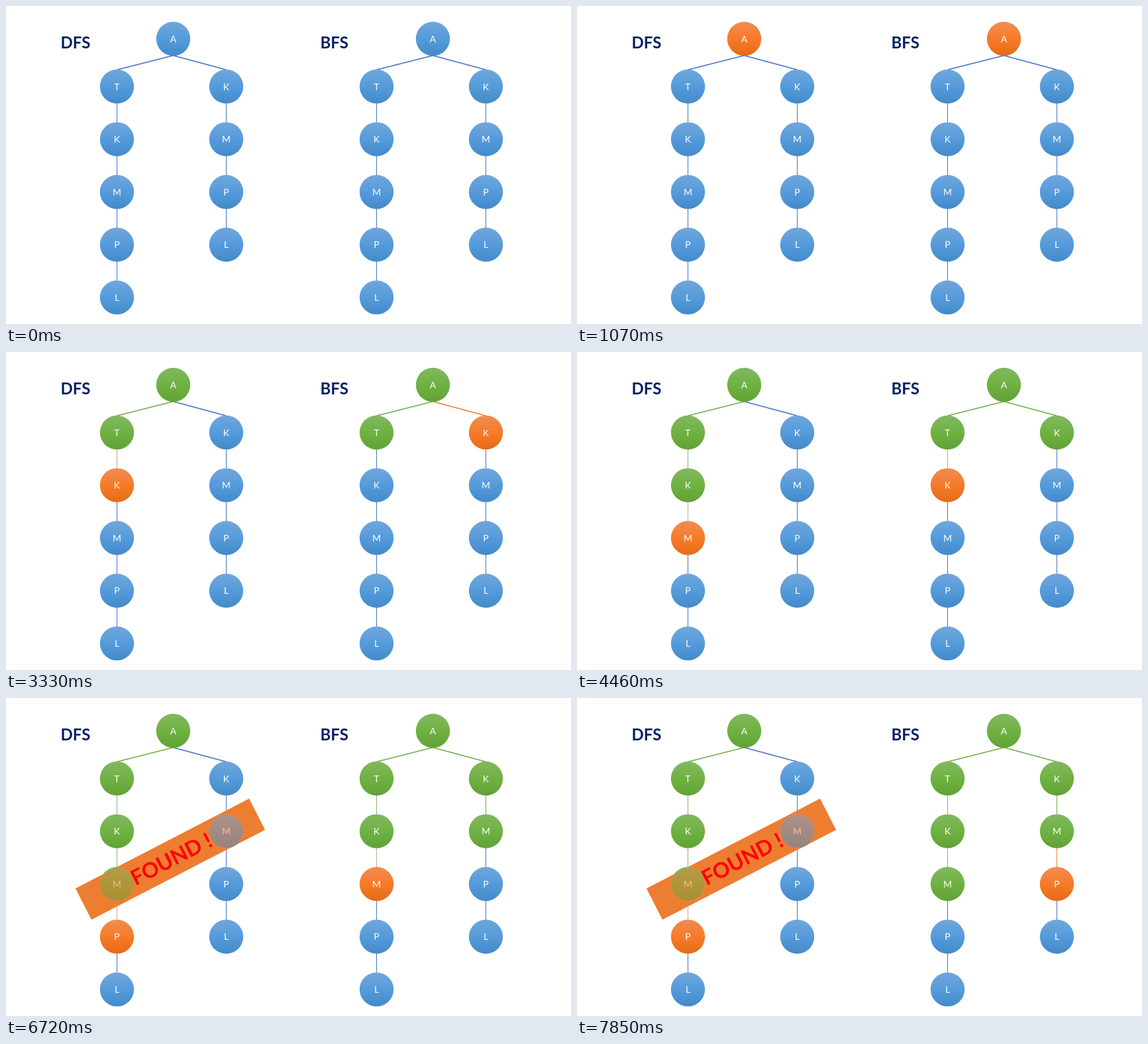
Write an HTML page with a canvas that moves like this. It is 853x480 px and loops after 8 s.

```html
<!DOCTYPE html>
<html lang="en">
<head>
<meta charset="utf-8">
<title>DFS and BFS</title>
<style>
html, body { margin: 0; width: 100%; height: 100%; overflow: hidden; background: #fff; }
canvas { display: block; }
</style>
</head>
<body>
<canvas id="stage" width="853" height="480"></canvas>
<script>
const ctx = document.getElementById('stage').getContext('2d');
const LOOP = 8000, FIRST = 1070, STEP = 1130;
const R = 25.7, FONT = 'Lato, "Open Sans", sans-serif';

const FILL = {
  idle: ['#71a6db', '#559bdb', '#438ac9'],
  active: ['#f18c55', '#f67b28', '#e56b17'],
  done: ['#81b861', '#6fb242', '#61a235']
};
const EDGE = { idle: '#4472c4', active: '#ed7d31', done: '#70ad47' };
const SOFT_EDGE = { idle: '#4472c4', active: '#c9a793', done: '#8fae78' };

// Node 0 is the root, 1-5 the left branch, 6-9 the right branch.
const nodes = [{ name: 'A', x: 252.5, y: 49.5, parent: -1 }];
function addBranch(names, x) {
  [...names].forEach((name, i) => {
    nodes.push({ name, x, y: 121.5 + 79.6 * i, parent: i ? nodes.length - 1 : 0 });
  });
}
addBranch('TKMPL', 167.5);
addBranch('KMPL', 332.5);

const trees = [
  { title: 'DFS', dx: 0, order: [0, 1, 2, 3, 4] },
  { title: 'BFS', dx: 392, order: [0, 1, 6, 2, 7, 3, 8] }
];

function stateOf(tree, id, step) {
  const current = Math.min(step, tree.order.length) - 1;
  const at = tree.order.indexOf(id);
  if (at < 0 || at > current) return 'idle';
  return at === current ? 'active' : 'done';
}

function drawEdge(node, id, state) {
  const from = nodes[node.parent];
  const slanted = node.parent === 0;
  ctx.strokeStyle = (!slanted && id < 6 ? SOFT_EDGE : EDGE)[state];
  ctx.lineWidth = slanted ? 1.6 : 1;
  ctx.beginPath();
  ctx.moveTo(from.x, from.y + R - 0.5);
  ctx.lineTo(node.x, node.y - R + 0.5);
  ctx.stroke();
}

function drawNode({ name, x, y }, state) {
  const shade = ctx.createLinearGradient(0, y - R, 0, y + R);
  FILL[state].forEach((color, i) => shade.addColorStop(i / 2, color));
  ctx.fillStyle = shade;
  ctx.beginPath();
  ctx.arc(x, y, R, 0, 2 * Math.PI);
  ctx.fill();
  ctx.fillStyle = '#fff';
  ctx.font = '14px ' + FONT;
  ctx.textAlign = 'center';
  ctx.fillText(name, x, y + 5);
}

function drawTree(tree, step) {
  ctx.save();
  ctx.translate(tree.dx, 0);
  ctx.fillStyle = '#002060';
  ctx.font = 'bold 24px ' + FONT;
  ctx.textAlign = 'left';
  ctx.fillText(tree.title, 82.5, 64);
  nodes.forEach((node, id) => {
    if (id) drawEdge(node, id, stateOf(tree, id, step));
  });
  nodes.forEach((node, id) => drawNode(node, stateOf(tree, id, step)));
  ctx.restore();
}

// The banner covers the page but lets the two M nodes show through.
function drawBanner() {
  ctx.save();
  ctx.beginPath();
  ctx.moveTo(105, 287.5);
  ctx.lineTo(367, 152);
  ctx.lineTo(391, 199);
  ctx.lineTo(129, 334.5);
  ctx.closePath();
  ctx.clip();
  ctx.fillStyle = '#ed7d31';
  ctx.globalAlpha = 0.5;
  ctx.fillRect(100, 145, 300, 195);
  ctx.globalAlpha = 1;
  ctx.beginPath();
  ctx.rect(100, 145, 300, 195);
  for (const { x, y } of [nodes[3], nodes[7]]) {
    ctx.moveTo(x + R, y);
    ctx.arc(x, y, R, 0, 2 * Math.PI);
  }
  ctx.fill('evenodd');
  ctx.restore();

  ctx.save();
  ctx.translate(248.5, 243.5);
  ctx.rotate(Math.atan2(-135.5, 262));
  ctx.fillStyle = '#f00';
  ctx.font = 'bold 32px ' + FONT;
  ctx.textAlign = 'center';
  ctx.fillText('FOUND !', 1, 11.5);
  ctx.restore();
}

function draw() {
  const t = performance.now() % LOOP;
  const step = t < FIRST ? 0 : 1 + Math.floor((t - FIRST) / STEP);
  ctx.fillStyle = '#fff';
  ctx.fillRect(0, 0, 853, 480);
  trees.forEach(tree => drawTree(tree, step));
  if (step >= 6) drawBanner();
  requestAnimationFrame(draw);
}
draw();
</script>
</body>
</html>
```
